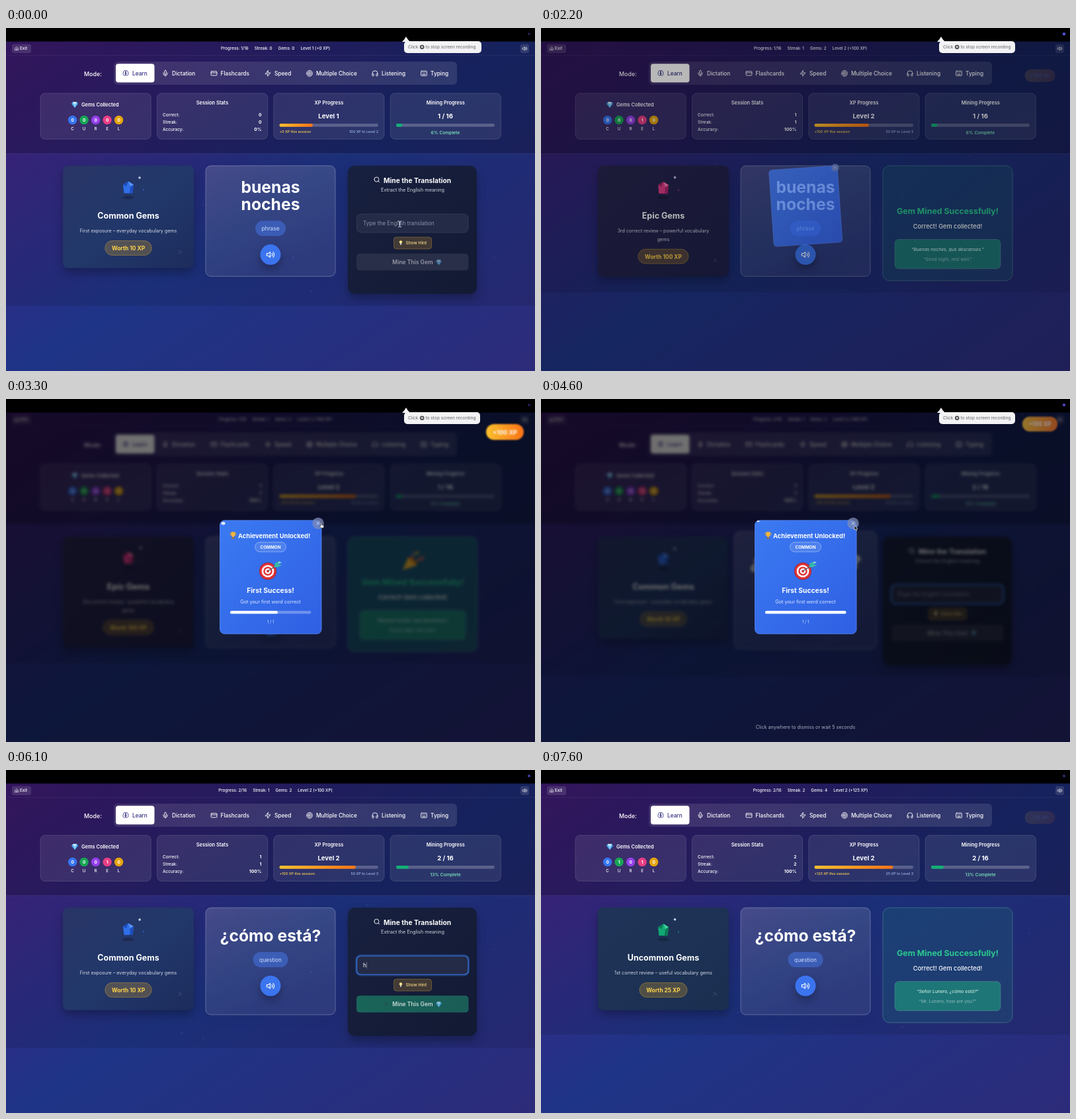
Animation of 800x520 px, one loop 7700 ms. Source, as an HTML page:

```html
<!DOCTYPE html>
<html lang="en">
<head>
<meta charset="utf-8">
<title>Vocabulary mining</title>
<style>
html, body { margin: 0; width: 100%; height: 100%; overflow: hidden; background: #000; }
svg { display: block; width: 800px; height: 520px; font-family: Inter, "Open Sans", sans-serif; }
text { dominant-baseline: central; white-space: pre; }
.shade { filter: drop-shadow(0 7px 7px rgba(0, 0, 0, .28)); }
</style>
</head>
<body>
<svg id="stage" viewBox="0 0 800 520">
  <defs>
    <linearGradient id="page" gradientUnits="userSpaceOnUse" x1="115" y1="-165" x2="685" y2="705">
      <stop offset="0" stop-color="#551b85"/><stop offset=".5" stop-color="#1e3486"/><stop offset="1" stop-color="#2f2977"/>
    </linearGradient>
    <linearGradient id="gold"><stop offset="0" stop-color="#fbc02d"/><stop offset="1" stop-color="#f97316"/></linearGradient>
    <linearGradient id="leaf"><stop offset="0" stop-color="#0a9a6a"/><stop offset="1" stop-color="#0b8a66"/></linearGradient>
    <linearGradient id="slate" x2="1" y2="1"><stop offset="0" stop-color="#293466"/><stop offset=".5" stop-color="#22386a"/><stop offset="1" stop-color="#1c2c5c"/></linearGradient>
    <linearGradient id="moss" x2="1" y2="1"><stop offset="0" stop-color="#1f3458"/><stop offset="1" stop-color="#1a2f50"/></linearGradient>
    <linearGradient id="dusk" x2="1" y2="1"><stop offset="0" stop-color="#27264f"/><stop offset="1" stop-color="#1e2049"/></linearGradient>
    <linearGradient id="night" x2="1" y2="1"><stop offset="0" stop-color="#182040"/><stop offset="1" stop-color="#121a33"/></linearGradient>
    <linearGradient id="glass" x2=".4" y2="1"><stop offset="0" stop-color="#fff" stop-opacity=".16"/><stop offset="1" stop-color="#fff" stop-opacity=".07"/></linearGradient>
    <linearGradient id="azure" x2="1" y2="1"><stop offset="0" stop-color="#3b7af2"/><stop offset="1" stop-color="#2f5fe3"/></linearGradient>
  </defs>
  <g id="view"></g>
</svg>
<script>
const LOOP = 7700, STEP = 100;
const SOLVED = [2000, 7400], NEXT = 4500, DISMISS = 4600;

const ICONS = {
  home: 'M3 10l9-7 9 7v11H3zM9 21v-9h6v9',
  sound: 'M11 5L6 9H2v6h4l5 4zM15.5 8.5a5 5 0 010 7M19 5a10 10 0 010 14',
  brain: 'M12 5a3 3 0 10-6 .1A4 4 0 004 11a4 4 0 001 6.5A4 4 0 0012 18zM12 5a3 3 0 116 .1A4 4 0 0120 11a4 4 0 01-1 6.5A4 4 0 0112 18zM15 13a4.5 4.5 0 01-3-4 4.5 4.5 0 01-3 4',
  mic: 'M12 2a3 3 0 00-3 3v7a3 3 0 006 0V5a3 3 0 00-3-3zM19 10v2a7 7 0 01-14 0v-2M12 19v3',
  card: 'M4 5h16a2 2 0 012 2v10a2 2 0 01-2 2H4a2 2 0 01-2-2V7a2 2 0 012-2zM2 10h20',
  zap: 'M13 2L3 14h9l-1 8 10-12h-9z',
  rings: 'M2 12a10 10 0 1020 0 10 10 0 10-20 0M6 12a6 6 0 1012 0 6 6 0 10-12 0M10 12a2 2 0 104 0 2 2 0 10-4 0',
  phones: 'M3 14h3a2 2 0 012 2v3a2 2 0 01-2 2H5a2 2 0 01-2-2v-7a9 9 0 0118 0v7a2 2 0 01-2 2h-1a2 2 0 01-2-2v-3a2 2 0 012-2h3',
  keys: 'M4 4h16a2 2 0 012 2v12a2 2 0 01-2 2H4a2 2 0 01-2-2V6a2 2 0 012-2zM6 8h.01M10 8h.01M14 8h.01M18 8h.01M8 12h.01M12 12h.01M16 12h.01M7 16h10',
  search: 'M3 11a8 8 0 1016 0 8 8 0 10-16 0M21 21l-4.3-4.3',
  close: 'M18 6L6 18M6 6l12 12',
  pick: 'M4 20L15 9M7 4c6 0 10 4 12 12'
};

const MODES = [['brain', 181, 'Learn'], ['mic', 241, 'Dictation'], ['card', 314.5, 'Flashcards'], ['zap', 396, 'Speed'],
  ['rings', 459, 'Multiple Choice'], ['phones', 558, 'Listening'], ['keys', 632, 'Typing']];

const ITEMS = [
  { lines: ['buenas', 'noches'], top: 241, kind: 'phrase', chip: 46, foot: 376.5, answer: 'good evening', from: 500, pace: 130,
    quote: ['“Buenas noches, que descanses.”', '“Good night, rest well.”'] },
  { lines: ['¿cómo está?'], top: 251, kind: 'question', chip: 53, foot: 371, answer: 'how are you', from: 6000, pace: 115,
    quote: ['“Señor Lunero, ¿cómo está?”', '“Mr. Lunero, how are you?”'] }
];

const GEMS = {
  common: { name: 'Common Gems', note: ['First exposure – everyday vocabulary gems'], xp: 10, tone: ['#2f6fe8', '#1e4fc0', '#5b93f7'], back: 'slate' },
  uncommon: { name: 'Uncommon Gems', note: ['1st correct review – useful vocabulary gems'], xp: 25, tone: ['#12a873', '#0b7a55', '#3fd29c'], back: 'moss' },
  epic: { name: 'Epic Gems', note: ['3rd correct review – powerful vocabulary', 'gems'], xp: 100, tone: ['#dd3b86', '#a8256b', '#f47bb0'], back: 'dusk' }
};

const ramp = (t, a, b) => Math.min(1, Math.max(0, (t - a) / (b - a)));
const smooth = p => p * p * (3 - 2 * p);
const easeOut = p => 1 - (1 - p) ** 2;
const mix = (a, b, p) => a + (b - a) * p;

const text = (x, y, size, weight, str, fill = '#fff', anchor = 'middle', extra = '') =>
  `<text x="${x}" y="${y}" font-size="${size}" font-weight="${weight}" fill="${fill}" text-anchor="${anchor}" ${extra}>${str}</text>`;
const box = (x1, y1, x2, y2, r, fill, extra = '') =>
  `<rect x="${x1}" y="${y1}" width="${x2 - x1}" height="${y2 - y1}" rx="${r}" fill="${fill}" ${extra}/>`;
const line = (color, width = .7) => `stroke="${color}" stroke-width="${width}"`;
const white = a => `rgba(255,255,255,${a})`;
const disc = (x, y, r, fill, extra = '') => `<circle cx="${x}" cy="${y}" r="${r}" fill="${fill}" ${extra}/>`;
const shape = (d, fill) => `<path d="${d}" fill="${fill}"/>`;
const group = (transform, body, extra = '') => `<g transform="${transform}" ${extra}>${body}</g>`;
const icon = (name, x, y, size, color = '#fff', width = 2) =>
  group(`translate(${x - size / 2} ${y - size / 2}) scale(${size / 24})`,
    `<path d="${ICONS[name]}" fill="none" stroke="${color}" stroke-width="${width}" stroke-linecap="round" stroke-linejoin="round"/>`);

const diamond = (x, y, s) => group(`translate(${x} ${y}) scale(${s})`,
  shape('M-5-1L-3-4H3L5-1L0 5Z', '#4aa8ee') + shape('M-2-1L-3-4H3L2-1Z', '#c4e9ff') + shape('M-2-1H2L0 5Z', '#8fd0fb'));

const bulb = (x, y) => disc(x, y - 1, 2.2, '#fde68a') + box(x - 1, y + .8, x + 1, y + 3.2, .5, '#cbd5e1');

const trophy = (x, y) => group(`translate(${x} ${y})`,
  `<path d="M-3-3h-1.500v2l2 2M3-3h1.500v2l-2 2" fill="none" stroke="#e09b1b"/>` +
  shape('M-3-5H3V0Q2 2 .7 2.300V3.500H2.500V5H-2.500V3.500H-.7V2.300Q-2 2-3 0Z', '#f6b73c') + box(-2.5, 3.4, 2.5, 5, .3, '#8a5a2b'));

const dartboard = () => [[13, '#b51f24'], [12, '#e0363a'], [9.3, '#fff'], [6.8, '#e0363a'], [4.3, '#fff'], [2, '#e0363a']]
  .map(([r, c]) => disc(396, 261, r, c)).join('') +
  '<path d="M396 261L410 252" stroke="#51606e" stroke-width="1.3"/>' +
  shape('M405 255L407 249L412 246L411 250L417 252L411 255Z', '#37b7a5') + shape('M411 250L413 246L417 248Z', '#8be0d2');

function popper(scale) {
  const bits = ['#ef4444', '#3b82f6', '#22c55e', '#facc15', '#ec4899', '#f97316']
    .map((c, i) => disc(-4 + i * 4, -9 + Math.abs(i - 2) * 3 - (i % 2) * 4, 1.6, c)).join('');
  return group(`translate(615 244) scale(${scale})`, shape('M-15 15L-6-5L7 8Z', '#f2b632') +
    shape('M-6-5Q2-4 7 8Q-2 6-6-5Z', '#c77a1d') + '<path d="M0-2Q1-10 7-13M4 3Q10-3 15 1" fill="none" stroke="#ef6a3a" stroke-width="2"/>' + bits);
}

function header(done, level) {
  const parts = [`Progress: ${level.word}/16`, `Streak: ${done}`, `Gems: ${done * 2}`, `Level ${done ? 2 : 1} (+${level.xp} XP)`];
  return box(9, 24.5, 38, 38, 3, white(.12)) + icon('home', 16.2, 31, 6.6) + text(21, 31.2, 6.3, 500, 'Exit', '#fff', 'start') +
    text(407.5, 31.2, 6.25, 500, parts.map((p, i) => `<tspan dx="${i ? 9 : 0}">${p}</tspan>`).join('')) +
    box(778, 24.5, 791, 38, 3, white(.12)) + icon('sound', 784.6, 31.2, 8) + box(0, 41, 800, 41.6, 0, white(.09));
}

const modeBar = () => text(118, 69, 8.9, 500, 'Mode:', '#fff', 'start') + box(163, 51, 682, 86, 6, white(.11)) +
  box(166, 54.3, 224.5, 82.5, 4, '#fff') +
  MODES.map(([name, x, label], i) => {
    const color = i ? '#fff' : '#312e81';
    return icon(name, x, 68.8, 10.6, color) + text(x + 10, 69, 8.3, 500, label, color, 'start');
  }).join('');

function stats(t, done, level) {
  const panels = ['', 'Session Stats', 'XP Progress', 'Mining Progress'].map((title, i) => {
    const x = 52 + i * 176.4;
    return box(x, 99, x + 167.2, 168.5, 7, white(.085), line(white(.2))) + text(x + 83.6, 113.8, 7.4, 600, title);
  }).join('');
  const counts = [0, done > 1 ? 1 : 0, 0, done ? 1 : 0, 0];
  const colors = ['#3775ef', '#17a554', '#9540ea', '#e83e83', '#e5a50d'];
  const gems = colors.map((c, i) => {
    const x = 100.6 + i * 17.5;
    return disc(x, 139.5, 6.7, c) + text(x, 139.7, 6.5, 700, counts[i]) + text(x, 152.7, 6.3, 500, 'CUREL'[i]);
  }).join('');
  const rows = [['Correct:', done], ['Streak:', done], ['Accuracy:', done ? '100%' : '0%']].map(([k, v], i) =>
    text(237, 131.7 + i * 11, 6.5, 500, k, '#fff', 'start') + text(386.5, 131.7 + i * 11, 6.7, 700, v, '#fff', 'end')).join('');
  const grow = n => easeOut(ramp(t, SOLVED[n], SOLVED[n] + 700));
  const xpEnd = 464 + 65 * grow(0) + 7 * grow(1);
  const mined = 599.3 + 9.7 * easeOut(ramp(t, NEXT, NEXT + 500));
  return panels + diamond(104, 116, 1) + text(114, 116, 7.4, 600, 'Gems Collected', '#fff', 'start') + gems + rows +
    text(488, 133.8, 9.6, 700, `Level ${done ? 2 : 1}`) + box(413.5, 145, 563, 149.8, 2.4, white(.22)) +
    box(413.5, 145, xpEnd, 149.8, 2.4, 'url(#gold)') +
    text(413.5, 157.3, 5.4, 500, `+${level.xp} XP this session`, '#fcd34d', 'start') +
    text(563, 157.3, 5.4, 400, level.left, '#b4ccfb', 'end') +
    text(664.5, 133.8, 9.6, 700, `${level.word} / 16`) + box(590, 145, 739, 149.8, 2.4, white(.22)) +
    box(590, 145, mined, 149.8, 2.4, '#12b076') + text(664.5, 158.6, 6.7, 500, level.word > 1 ? '13% Complete' : '6% Complete', '#7ff0c0');
}

function gemCard(t, since, gem) {
  const more = (gem.note.length - 1) * 12.8;
  const phase = since / 1700 * 2 * Math.PI;
  const [base, dark, light] = gem.tone;
  const half = gem.xp > 99 ? 38 : gem.xp > 10 ? 36 : 35.2;
  const crystal = group(`translate(185 ${242.500 + Math.sin(phase)}) rotate(${2 * Math.sin(phase)})`,
    shape('M0-10L8-5L6.500 8H-6.500L-8-5Z', base) + shape('M0-10L8-5L3-2Z', light) + shape('M8-5L6.500 8L2 8L3-2Z', dark) + shape('M0-10L-8-5L-3-2Z', dark));
  return box(86, 208.5, 284, 364 + more, 8, `url(#${gem.back})`, 'class="shade"') +
    `<ellipse cx="185" cy="257" rx="9" ry="2.500" fill="rgba(0,0,0,.22)"/>` + crystal +
    disc(204 - 2 * Math.cos(phase), 225.4 + 1.6 * Math.cos(phase), 1.8, '#c3cbe4') + disc(208, 245 + Math.sin(phase), .9, base) +
    text(185, 284, 12.5, 700, gem.name) + gem.note.map((n, i) => text(185, 307.3 + i * 12.8, 7.15, 400, n, '#d5d9e6')).join('') +
    box(185 - half, 322.5 + more, 185 + half, 344.5 + more, 11, 'rgba(217,160,40,.27)', line('rgba(250,190,50,.5)')) +
    text(185, 333.7 + more, 8.4, 700, `Worth ${gem.xp} XP`, '#fcd34d') + icon('pick', 263, 340 + more, 8, white(.22));
}

function wordCard(t, item) {
  const last = item.top + (item.lines.length - 1) * 26.3;
  const scale = t < NEXT ? 1 : 1 + .1 * (1 - smooth(ramp(t, NEXT + 100, NEXT + 500)));
  return group(`translate(400 290) scale(${scale}) translate(-400 -290)`,
    box(302, 208.8, 498, item.foot, 8, 'url(#glass)', 'class="shade" ' + line(white(.38))) +
    item.lines.map((w, i) => text(400, item.top + i * 26.3, 24.7, 700, w)).join('') +
    box(400 - item.chip / 2, last + 25, 400 + item.chip / 2, last + 48, 11.5, 'rgba(70,120,235,.5)') +
    text(400, last + 36.6, 8.3, 400, item.kind, '#cfe0ff') +
    disc(400, last + 76.3, 15.5, '#3b74ef', 'class="shade"') + icon('sound', 400, last + 76.3, 13.5));
}

function answerCard(t, item) {
  const count = t < item.from ? 0 : Math.min(item.answer.length, Math.floor((t - item.from) / item.pace) + 1);
  const focus = t >= 300;
  const ready = ramp(t, item.from, item.from + 200);
  const field = count ? item.answer.slice(0, count) : '';
  const caret = focus ? '<tspan dx="-.8" font-weight="200">|</tspan>' : '';
  return box(517, 208.8, 712, 403, 10, 'url(#night)', 'class="shade"') +
    icon('search', 560.8, 230, 10.6) + text(571, 230.5, 10.25, 700, 'Mine the Translation', '#fff', 'start') +
    text(615, 245.3, 7.3, 400, 'Extract the English meaning', '#d1d5db') +
    (focus ? box(529.5, 281, 699.7, 311, 7, 'none', line('rgba(59,130,246,.3)', 3)) : '') +
    box(530.5, 282, 699, 310, 6, '#242b47', line(focus ? '#3b74e0' : '#3b4361', focus ? 1.2 : .7)) +
    (field ? '' : text(540, 296.3, 8.25, 400, 'Type the English translation', '#8c93a8', 'start')) +
    text(540, 296.3, 8.25, 400, field + caret, '#fff', 'start') +
    box(586.5, 317, 643.5, 335, 4, 'rgba(200,145,40,.25)', line('rgba(245,185,60,.45)')) + bulb(597, 325.5) +
    text(604.5, 326.2, 6.5, 500, 'Show Hint', '#f8d98a', 'start') +
    box(530, 342, 699.5, 367.6, 5, '#292f48') + box(530, 342, 699.5, 367.6, 5, 'url(#leaf)', `opacity="${ready}"`) +
    `<g opacity="${mix(.5, 1, ready)}">` + icon('pick', 575, 355, 8, '#2c3a42', 3) + text(615, 355.2, 8.5, 600, 'Mine This Gem') + diamond(654.5, 355, .9) + '</g>';
}

function successCard(d, item) {
  const p = ramp(d, 200, 600);
  return box(517, 208.8, 713, 383, 10, `rgba(25,125,112,${mix(.22, .5, p)})`, line('rgba(110,200,160,.35)', 1)) +
    (p ? popper(smooth(p)) : '') +
    text(615, 277.3, 12.35, 700, 'Gem Mined Successfully!', '#2bc98e') + text(615, 300.2, 9.2, 500, 'Correct! Gem collected!') +
    box(535, 320.5, 695, 365, 6, 'rgba(30,175,125,.5)', line(white(.22))) +
    text(615, 335.3, 6.75, 400, item.quote[0], '#e6fff5', 'middle', 'font-style="italic"') +
    text(615, 350.5, 6.75, 400, item.quote[1], white(mix(.5, .7, p)));
}

function motes(t, foot) {
  let out = '', seed = 7;
  const rnd = () => (seed = seed * 16807 % 2147483647) / 2147483647;
  for (let i = 0; i < 12; i++) {
    const x = rnd() * 800, y = rnd() * 225, speed = 6 + rnd() * 10;
    out += disc(x, 192 + (y + 225 - t / 1000 * speed % 225) % 225 * (foot - 194) / 225, .8, 'rgba(140,165,255,.28)');
  }
  return out;
}

function popup(d, label, blur) {
  if (d < 150 || d > 2750) return '';
  const rise = ramp(d, 180, 700), leave = ramp(d, 1800, 3000);
  const alpha = ramp(d, 150, 600) * (1 - ramp(d, 2300, 3000));
  return group(`translate(754.500 ${73 - 23 * rise - 18 * leave}) scale(${.8 + .2 * rise - .1 * leave})`,
    box(-28.5, -12, 28.5, 12, 12, 'url(#gold)') + text(0, .2, 9, 700, label), `opacity="${alpha}" style="filter:blur(${blur * .5}px)"`);
}

function modal(t, out) {
  const grow = smooth(ramp(t, 2000, 2500));
  const fade = (a, b) => `opacity="${ramp(t, a, b)}"`;
  const alpha = mix(.35, 1, ramp(t, 2000, 2500)) * out;
  const fill = mix(339, 461.5, ramp(t, 2800, 3650));
  return group(`translate(400 270) rotate(${-6 * (1 - grow)}) scale(${.5 + .5 * grow}) translate(-400 -270)`,
    box(323.5, 184, 477, 356, 7, 'url(#azure)', line('#5b8cf5', .8)) +
    `<ellipse cx="328.500" cy="${t < 4000 ? 188.500 : 185.500}" rx="${t < 4000 ? 3 : 2.200}" ry="${t < 4000 ? 2.200 : 1}" fill="#e8f0ff" ${fade(2500, 2800)}/>` +
    `<g ${fade(2300, 2600)}>` + trophy(343.5, 206.5) + text(351, 207.2, 9.4, 700, 'Achievement Unlocked!', '#fff', 'start') +
    box(376.5, 217, 423.5, 231.8, 7.4, white(.12), line(white(.5))) + text(400, 224.6, 6.3, 700, 'COMMON') + '</g>' +
    `<g ${fade(2400, 2700)}>` + dartboard() + '</g>' +
    `<g ${fade(2500, 2800)}>` + text(400, 290.2, 10.3, 700, 'First Success!') + text(400, 307.4, 7.3, 400, 'Got your first word correct', '#dce8ff') +
    box(339, 321.2, 461.5, 325.6, 2.2, white(.3)) + (fill > 339 ? box(339, 321.2, fill, 325.6, 2.2, '#fff') : '') +
    text(400, 337, 6.2, 400, '1 / 1', '#d3e0ff') + '</g>' +
    disc(472, 188.5, 8.7, 'rgba(125,140,185,.75)') + icon('close', 472, 188.5, 8), `opacity="${alpha}"`);
}

function overlay(t, shown) {
  if (!shown) return '';
  const out = 1 - ramp(t, DISMISS, DISMISS + 200);
  return box(0, 20, 800, 520, 0, `rgba(0,0,0,${.56 * shown})`) + modal(t, out) +
    text(400, 497.3, 7.2, 400, 'Click anywhere to dismiss or wait 5 seconds', '#a9adbd', 'middle', `opacity="${ramp(t, 4000, 4400) * out}"`);
}

function pointer(t) {
  if (t < 500 || (t >= 5300 && t < 6000))
    return '<path d="M593 293h1.500l1 .8l1-.8h1.500M593 301.500h1.500l1-.8l1 .8h1.500M595.500 293.800v7" fill="none" stroke="#e8eaf2" stroke-width="1"/>';
  if (t < 2700 || t >= 5300) return '';
  const come = smooth(ramp(t, 2700, 3200)), go = smooth(ramp(t, 4800, 5300));
  const x = mix(560, 476, come) - 2 * ramp(t, 4000, 4400) + 120 * go;
  const y = mix(300, 188, come) + 4 * ramp(t, 4000, 4400) + 104 * go;
  const hand = t >= 3100 && t < 4200;
  const d = hand ? 'M0 0Q1-1 1.600 0V3L4.500 3.600Q5 5 4 7.500H.3L-2 4.500Q-1.500 3.500 0 4.500Z' : 'M0 0L0 6.500L1.600 5.200L2.700 7.700L3.800 7.200L2.800 4.800L4.800 4.700Z';
  return group(`translate(${x} ${y})`, `<path d="${d}" fill="${hand ? '#fff' : '#111'}" stroke="${hand ? '#222' : '#fff'}" stroke-width=".6"/>`);
}

function recordingTip(t) {
  const alpha = 1 - ramp(t, 4900, 5200), right = t < 300 ? 719 : 717;
  return `<g opacity="${alpha}">` + shape('M599 21Q603 17 605 13Q607 17 611 21Z', '#f3f3f5') + box(602, 20, right, 38, 5, '#f3f3f5') +
    text(608, 29, 6.5, 500, 'Click', '#77777c', 'start') + disc(629.2, 28.8, 3.4, '#55555a') + disc(629.2, 28.8, 1.3, '#f3f3f5') +
    text(634.5, 29, 6.5, 500, 'to stop screen recording', '#77777c', 'start') + '</g>';
}

function scene(t) {
  const done = SOLVED.filter(s => t >= s).length;
  const index = t >= NEXT ? 1 : 0;
  const item = ITEMS[index], since = t - SOLVED[index], solved = since >= 0;
  const level = { word: index + 1, xp: [0, 100, 125][done], left: ['100 XP to Level 2', '50 XP to Level 3', '25 XP to Level 3'][done] };
  const gem = GEMS[solved ? ['epic', 'uncommon'][index] : 'common'];
  const gemSince = solved ? since : index ? t - NEXT : t;
  const out = 1 - ramp(t, DISMISS, DISMISS + 200);
  const shown = ramp(t, 2000, 2400) * out, blur = 2.2 * ramp(t, 2200, 2400) * out;
  const foot = solved ? 401 : 421;
  const app = box(-20, 0, 820, 540, 0, 'url(#page)') + box(-20, 0, 820, foot, 0, 'rgba(0,0,0,.1)') +
    box(-20, 0, 820, 190, 0, 'rgba(8,2,20,.27)') + box(0, 190, 800, 190.6, 0, white(.08)) + motes(t, foot) +
    header(done, level) + modeBar() + stats(t, done, level) + gemCard(t, gemSince, gem) + wordCard(t, item) +
    (solved ? successCard(since, item) : answerCard(t, item));
  const pulse = .7 - .3 * Math.cos(t / 3500 * 2 * Math.PI);
  return `<g ${blur ? `style="filter:blur(${blur}px)"` : ''}>${app}</g>` + overlay(t, shown) +
    popup(t - SOLVED[0], '+100 XP', blur) + popup(t - SOLVED[1], '+25 XP', 0) +
    box(0, 0, 800, 20.5, 0, '#000') + disc(791, 9, 1.5 + .8 * pulse, '#5a58f2', `opacity="${pulse}"`) + recordingTip(t) + pointer(t);
}

const view = document.getElementById('view');
const start = performance.now();
let drawn = -1;
function tick() {
  const t = Math.floor((performance.now() - start) % LOOP / STEP) * STEP;
  if (t !== drawn) view.innerHTML = scene(drawn = t);
  requestAnimationFrame(tick);
}
tick();
</script>
</body>
</html>
```
